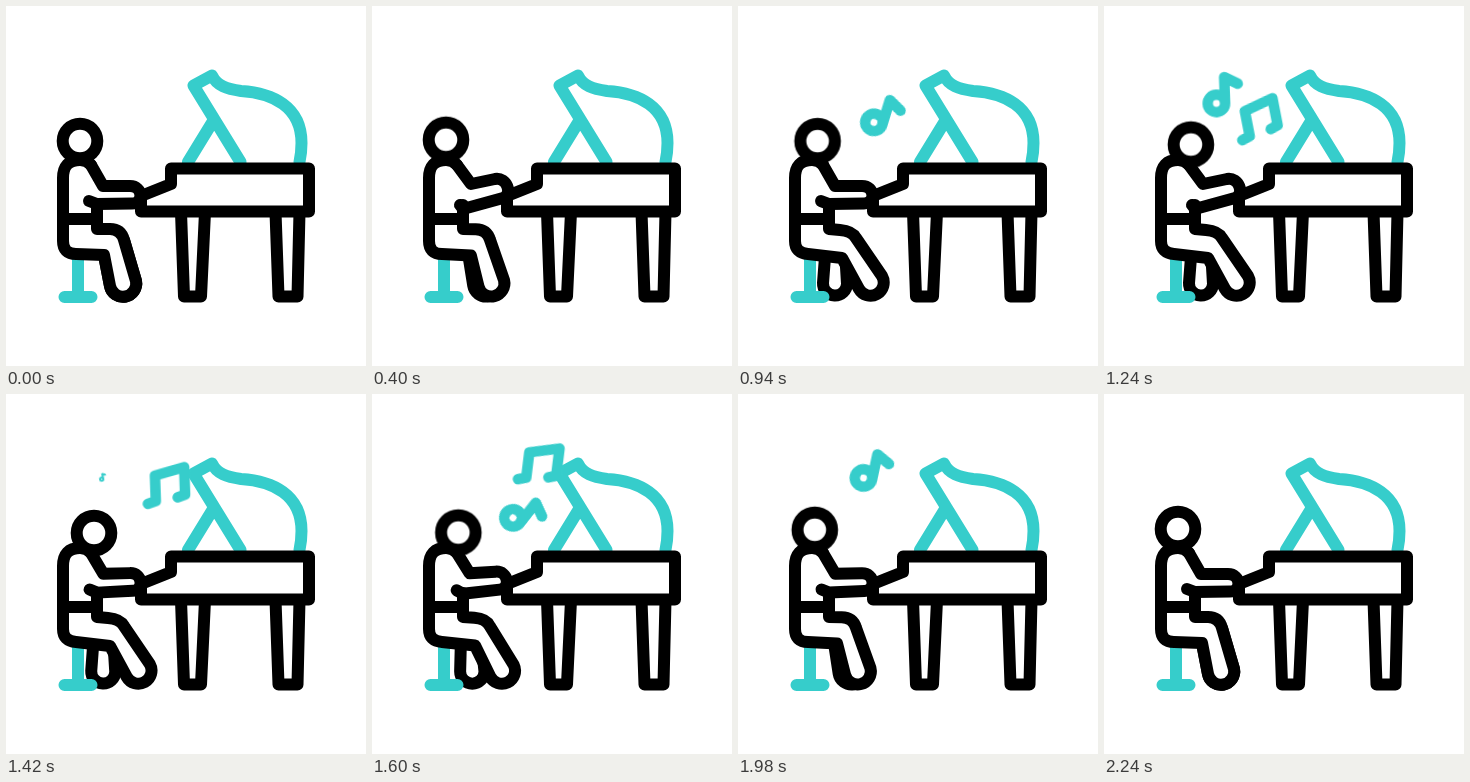
Recreate the animation shown at these times as an HTML page. Size 360 by 360 pixels, loop 2400 ms.

```html
<!DOCTYPE html>
<html lang="en">
<head>
<meta charset="utf-8">
<title>Pianist</title>
<style>
  html, body { margin: 0; width: 100%; height: 100%; overflow: hidden; background: #fff; }
  svg { display: block; width: 100vw; height: 100vh; }
  .ink, .teal { fill: none; stroke-linecap: round; stroke-linejoin: round; stroke-width: 12; }
  .ink { stroke: #000; }
  .teal { stroke: #36cdcb; }
  .solid { fill: #fff; }
  .note { stroke-width: 10.5; }

  .body, .leg, .arm, .head { animation: 2.4s ease-in-out infinite; }
  .body { animation-name: body; }
  .leg { animation-name: leg; }
  .arm { animation-name: arm; }
  .head { animation-name: head; }
  .note { animation: 2.4s linear infinite; transform: scale(0); }
  .first { animation-name: first; }
  .pair { animation-name: pair; }
  .last { animation-name: last; }

  @keyframes body {
    0%, 9.17%, 93.33%, 100% {
      d: path("M91 199 L91 223 L104 223 Q115 223 118 234 L130 275 A13 13 0 0 1 104 280 L98 249 L70 248 Q57 248 57 235 L57 172 Q57 154 74 154 Q81 154 85 159");
    }
    37.5%, 56.25% {
      d: path("M91 199 L91 223 L102 224 Q114 225 118 232 L144 270 A13 13 0 0 1 121 283 L104 252 L70 248 Q57 247 57 235 L57 172 Q57 154 74 154 Q81 154 85 159");
    }
  }
  @keyframes leg {
    0%, 9.17%, 93.33%, 100% { d: path("M98 249 L104 280 A13 13 0 0 0 130 275 L118 234"); }
    37.5%, 56.25% { d: path("M87 251 L85 277 A12 12 0 0 0 109 278 L107 244"); }
  }
  @keyframes arm {
    0%, 9.17%, 23.33%, 40%, 61.67%, 85%, 100% {
      d: path("M85 159 L97 180 L124 180 C137 180 138 197.5 126 197.5 L91 198 L83 195");
    }
    31.67% {
      d: path("M85 159 L98 179 L123 176 C136 175 139 193 128 195 L91 200 L85 197");
    }
    16.67%, 51.67%, 74.17% {
      d: path("M85 159 L99 178 L123 173 C135 171 141 188 131 192 L91 203 L88 199");
    }
  }
  @keyframes head {
    0%, 9.17%, 93.33%, 100% { transform: translate(74px, 135px); }
    24.17% { transform: translate(74px, 132.5px); }
    58.33% { transform: translate(88px, 139px); }
  }
  @keyframes first {
    0%, 23.33% { transform: translate(146px, 142px) rotate(47deg) scale(0); }
    26.67% { transform: translate(145px, 137px) rotate(43deg) scale(1); }
    29.17% { transform: translate(143px, 133px) rotate(38deg) scale(1); }
    39.17% { transform: translate(136px, 116.5px) rotate(17deg) scale(1); }
    51.67% { transform: translate(112.5px, 97.5px) rotate(-2deg) scale(1); }
    55.83% { transform: translate(103px, 90px) rotate(-8deg) scale(1); }
    60%, 100% { transform: translate(94px, 84px) rotate(-14deg) scale(0); }
  }
  @keyframes pair {
    0%, 40.83% { transform: translate(148px, 143px) rotate(-22deg) scale(0); }
    45% { transform: translate(151px, 132px) rotate(-18deg) scale(1); }
    51.67% { transform: translate(156px, 112.5px) rotate(-11deg) scale(1); }
    66.67% { transform: translate(169.5px, 70px) rotate(7deg) scale(1); }
    69.17% { transform: translate(171px, 65px) rotate(9deg) scale(1); }
    73.33%, 100% { transform: translate(173px, 54px) rotate(13deg) scale(0); }
  }
  @keyframes last {
    0%, 61.67% { transform: translate(143px, 137px) rotate(46deg) scale(0); }
    65% { transform: translate(142px, 128px) rotate(41deg) scale(1); }
    66.67% { transform: translate(141px, 124px) rotate(38deg) scale(1); }
    74.17% { transform: translate(136px, 105px) rotate(26deg) scale(1); }
    83.75% { transform: translate(124px, 81px) rotate(10deg) scale(1); }
    88.33%, 100% { transform: translate(117px, 70px) rotate(3deg) scale(0); }
  }
</style>
</head>
<body>
<svg viewBox="0 0 360 360">
  <defs>
    <path id="quaver" d="M8.7 0 A8.7 8.7 0 1 1 -8.7 0 A8.7 8.7 0 1 1 8.7 0 V-26 L22 -19"/>
  </defs>

  <path class="ink solid leg" d="M98 249 L104 280 A13 13 0 0 0 130 275 L118 234"/>
  <path class="teal" d="M72 252 V291 M58.5 291 H85.5"/>
  <path class="ink solid body" d="M91 199 L91 223 L104 223 Q115 223 118 234 L130 275 A13 13 0 0 1 104 280 L98 249 L70 248 Q57 248 57 235 L57 172 Q57 154 74 154 Q81 154 85 159"/>
  <path class="ink" d="M57 213 H91"/>
  <path class="ink arm" d="M85 159 L97 180 L124 180 C137 180 138 197.5 126 197.5 L91 198 L83 195"/>
  <circle class="ink solid head" r="17.3"/>

  <path class="teal" d="M234.5 156 L187.5 79.5 L206 69.5 C211 80 221 83 235 85 C266 87 295.5 100 295.5 137 Q295.5 147 293.5 156 M206.5 116 L182 156"/>
  <path class="ink" d="M175 206 L178 290.5 H195 L199 206 M269.5 206 L272.5 290.5 H291.5 L293.5 206"/>
  <path class="ink" d="M165 162.5 H303 V205.5 H135 V190 L165 178 Z"/>

  <use class="teal note first" href="#quaver"/>
  <path class="teal note pair" d="M-21.5 18 L-13.5 15.5 V-10 L16 -17.5 V10 L8.5 12.5"/>
  <use class="teal note last" href="#quaver"/>
</svg>
</body>
</html>
```
